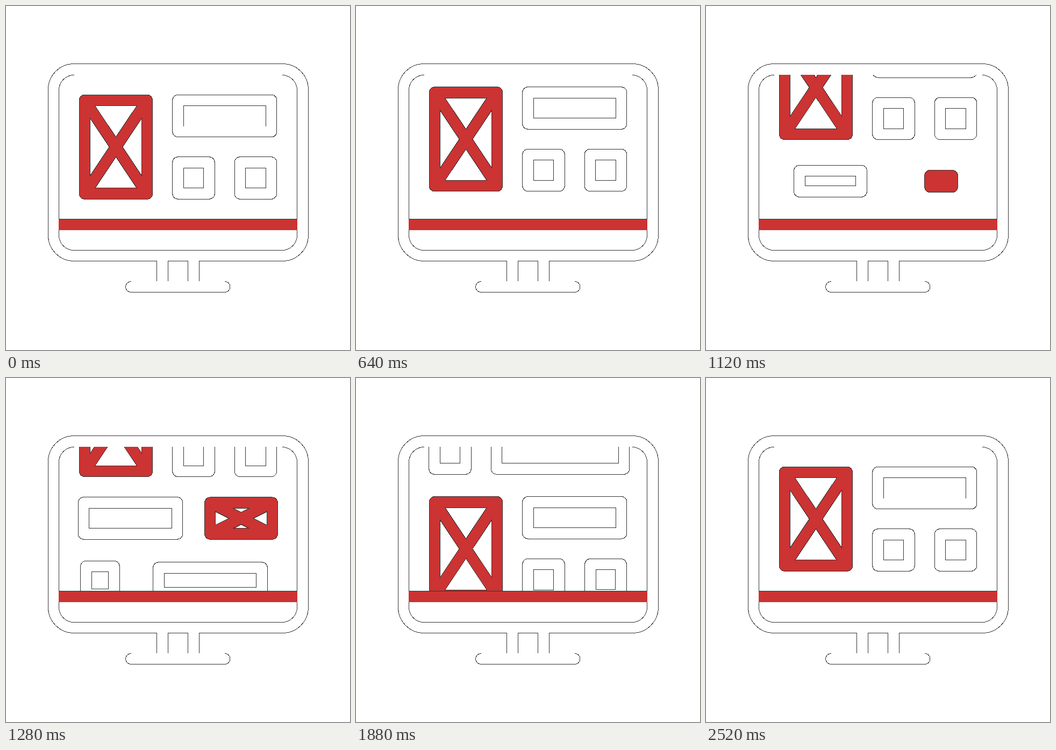
Write an HTML page that moves like this. It is 640x640 px and loops after 3000 ms.

```html
<!DOCTYPE html>
<html lang="en">
<head>
<meta charset="utf-8">
<title>Scrolling wireframe</title>
<style>
  html, body { margin: 0; width: 100%; height: 100%; overflow: hidden; background: #fff; }
  svg { display: block; width: 100vw; height: 100vh; }
  path { fill: none; stroke-linejoin: round; stroke-linecap: round; shape-rendering: crispEdges; }
  .edge { stroke: #333; stroke-width: 21.5; }
  .body { stroke: #fff; stroke-width: 19.5; }
  .red { stroke: #c33; }
  .line { stroke: #333; stroke-width: 1; stroke-linecap: butt; }
  .gap { stroke: #fff; stroke-width: 1; stroke-linecap: butt; }
</style>
</head>
<body>
<svg viewBox="0 0 640 640">
  <clipPath id="screen"><rect x="98" y="128" width="444" height="268"/></clipPath>
  <g clip-path="url(#screen)">
    <g id="page"></g>
    <path id="gap" class="gap" d="M331 223.5H483"/>
  </g>

  <!-- monitor -->
  <path class="line" d="M359.5 474.5H514.5A48 48 0 0 0 562.5 426.5V155.5A48 48 0 0 0 514.5 107.5H126.5A48 48 0 0 0 78.5 155.5V426.5A48 48 0 0 0 126.5 474.5H280.5M301.5 474.5H338.5"/>
  <path class="line" d="M126.5 128.5A28 28 0 0 0 98.5 156.5V426.5A28 28 0 0 0 126.5 454.5H513.5A28 28 0 0 0 541.5 426.5V156.5A28 28 0 0 0 513.5 128.5"/>
  <rect x="98" y="397" width="444" height="20" fill="#c33"/>
  <path class="line" d="M98 396.5H542"/>

  <!-- stand -->
  <path class="line" d="M280.5 474V512M301.5 474V512M338.5 474V512M359.5 474V512"/>
  <path class="line" d="M232.5 512.5A10 10 0 0 0 232.5 532.5H407A10 10 0 0 0 407 512.5"/>
</svg>
<script>
  const LOOP = 3000, STEP = 40, TRAVEL = 467.5, POP = 320;
  const page = document.getElementById('page');
  const gap = document.getElementById('gap');

  // cubic-bezier(.58, 0, .42, 1) solved by bisection
  function ease(x) {
    if (x <= 0) return 0;
    if (x >= 1) return 1;
    let lo = 0, hi = 1;
    for (let i = 0; i < 30; i++) {
      const s = (lo + hi) / 2, r = 1 - s;
      if (3 * r * r * s * 0.58 + 3 * r * s * s * 0.42 + s * s * s < x) lo = s;
      else hi = s;
    }
    return lo * lo * (3 - 2 * lo);
  }

  function addPath(name) {
    const path = document.createElementNS('http://www.w3.org/2000/svg', 'path');
    path.setAttribute('class', name);
    page.append(path);
    return path;
  }

  // centre x, centre y, half width, half height, crossed
  const first = [
    [204.5, 262.3, 58, 86.8, true],
    [406.8, 204.5, 86.9, 29],
    [349, 320, 29, 29],
    [464.5, 320, 29, 29]
  ];
  const middle = [
    [231.5, 436.5, 87, 29],
    [437.5, 436.7, 58, 29, true],
    [175, 552.2, 29, 29],
    [380, 552.2, 118.5, 29]
  ];
  const middleStart = [937, 980, 1045, 1070];
  const lastStart = [1325, 1350, 1570, 1595];

  function makeBox([x, y, w, h, crossed], start) {
    const paths = [addPath('edge'), addPath(crossed ? 'body red' : 'body')];
    return { x, y, w, h, crossed, start, paths };
  }

  const boxes = [
    ...first.map(b => makeBox(b, -POP)),
    ...middle.map((b, i) => makeBox(b, middleStart[i])),
    ...first.map(([x, y, ...rest], i) => makeBox([x, y + TRAVEL, ...rest], lastStart[i]))
  ];

  // Boxes grow from their centre while the stroke keeps its width
  function outline(box, scale, scroll) {
    if (!scale) return '';
    const w = box.w * scale, h = box.h * scale;
    const l = box.x - w, r = box.x + w;
    const t = box.y - scroll - h, b = box.y - scroll + h;
    const cross = box.crossed ? `M${l} ${t}L${r} ${b}M${r} ${t}L${l} ${b}` : '';
    return `M${l} ${t}H${r}V${b}H${l}Z${cross}`;
  }

  function draw(now) {
    const time = Math.floor(now / STEP) * STEP % LOOP;
    const progress = ease((time - 280) / 2240);
    for (const box of boxes) {
      const d = outline(box, ease((time - box.start) / POP), progress * TRAVEL);
      for (const path of box.paths) path.setAttribute('d', d);
    }
    gap.style.display = progress > 0 && progress < 1 ? 'none' : '';
  }

  function tick() {
    draw(performance.now());
    requestAnimationFrame(tick);
  }
  tick();
</script>
</body>
</html>
```
